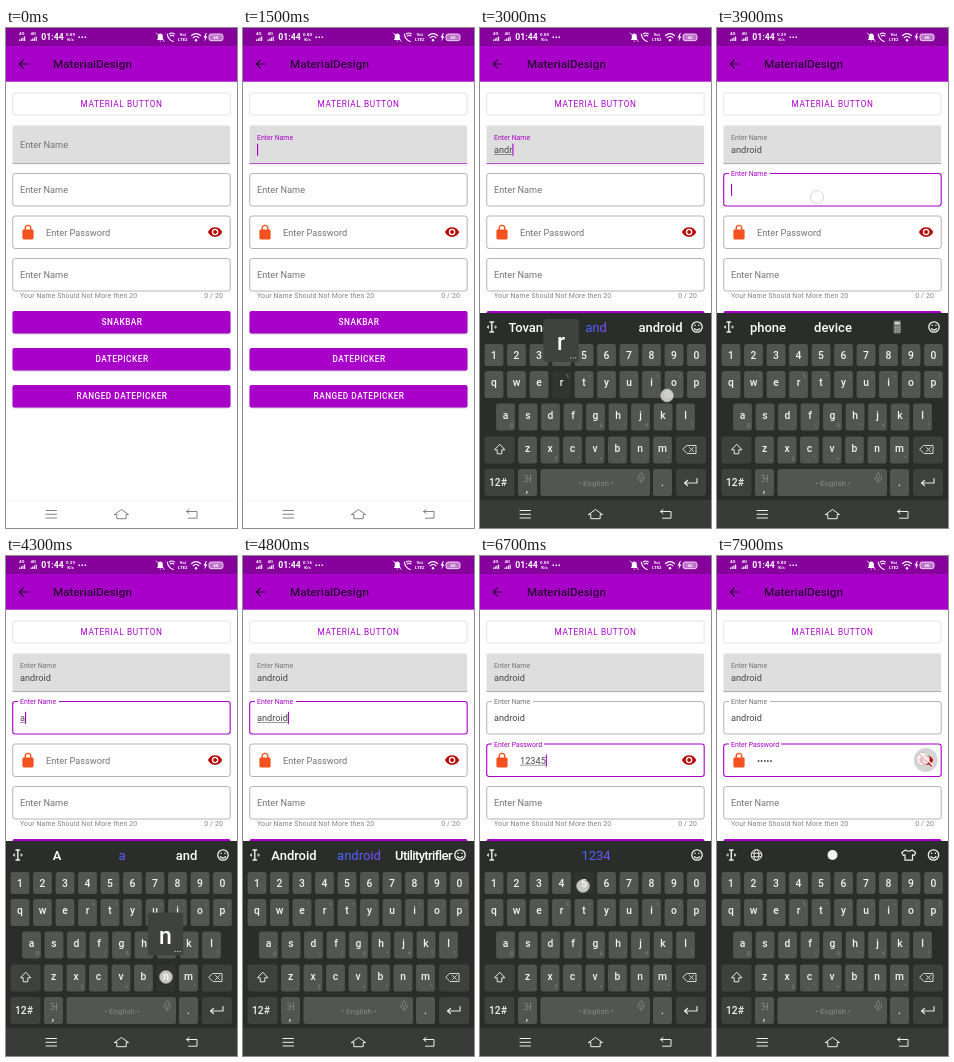
Animation, 231 px wide and 500 px high, one loop 8000 ms. Source, as an HTML page:

```html
<!DOCTYPE html>
<html lang="en">
<head>
<meta charset="utf-8">
<title>Material form</title>
<style>
html, body { margin: 0; width: 100%; height: 100%; overflow: hidden; background: #fff; }
svg { display: block; width: 100vw; height: 100vh; font-family: Roboto, sans-serif; }
text { white-space: pre; }
.mid { text-anchor: middle; }
.btn { font-size: 8.25px; font-weight: 500; letter-spacing: .52px; text-anchor: middle; }
.line { fill: none; stroke-linecap: round; stroke-linejoin: round; }
.help { font-size: 6.9px; fill: #828282; letter-spacing: .16px; }
.key { font-size: 10.3px; font-weight: 500; fill: #f2f2f2; text-anchor: middle; }
.alt { font-size: 4.5px; fill: #868983; text-anchor: middle; }
.sug { font-size: 13px; font-weight: 500; fill: #fff; text-anchor: middle; }
.tiny { font-size: 4.4px; font-weight: 700; }
</style>
</head>
<body>
<svg viewBox="0 0 231 500">
  <defs>
    <linearGradient id="hue">
      <stop offset="0" stop-color="#3f6bff"/><stop offset=".6" stop-color="#5a58ff"/><stop offset="1" stop-color="#7a50f5"/>
    </linearGradient>
    <g id="nav" class="line">
      <path d="M40 482.500h10.500M40 486.300h10.500M40 490h10.500"/>
      <path d="M108.500 486.500l7-5 7 5h-2.300v4.200h-9.400v-4.200z"/>
      <path d="M183 481.500l-2.500 2 2.500 2M180.500 483.500h10.500v6.700h-8.500"/>
    </g>
    <g id="caret" class="line" stroke="#eee">
      <path d="M10 294h3.600M10 304h3.600M11.800 294v10" stroke-width="1.400"/>
      <path d="M8.300 298l-1.300 1 1.300 1zM15.300 298l1.300 1-1.300 1z" stroke-width=".8"/>
    </g>
    <g id="smile" class="line" stroke="#f4f4f4" stroke-width="1.300">
      <circle cx="216.500" cy="299" r="5.200"/><path d="M214 300.800q2.500 2.600 5 0"/>
      <path d="M214.600 297.200v.2M218.400 297.200v.2"/>
    </g>
  </defs>

  <rect width="231" height="500" fill="#fefefe"/>
  <rect width="231" height="53.700" fill="#a800c8"/>
  <rect width="231" height="18" fill="#86009c"/>

  <g fill="#fff">
    <text class="tiny" x="13" y="7.300">4G</text><text class="tiny" x="24.500" y="7.300">4G</text>
    <path id="bars"/>
    <text x="35.300" y="12.300" font-size="8.700" font-weight="700">01:44</text>
    <text id="speed" class="tiny mid" x="64.500" y="8"></text>
    <text class="tiny mid" x="64.500" y="12.600">K/s</text>
    <path d="M72.500 9.300h1.500M75.500 9.300h1.500M78.500 9.300h1.500" stroke="#fff" stroke-width="1.500"/>
    <g transform="translate(-1.200 0)">
      <path d="M152 12h7l-1-1.500V8q0-2.500-2.500-2.500T153 8v2.500zM154.500 12.700h2l-1 1z"/>
      <path class="line" d="M151.500 5l8 8.500" stroke="#fff" stroke-width=".8"/>
      <path class="line" d="M162.500 6q.5 5.500 6 7.500M165.500 8q1.800-1.500 3.500 0M164.500 6q2.500-2 5 0" stroke="#fff" stroke-width="1.100"/>
      <text class="tiny mid" x="178" y="8">Vo)</text><text class="tiny mid" x="178" y="13">LTE2</text>
    </g>
    <path class="line" d="M185.500 7.500q4.500-3.800 9 0M187.200 9.700q2.800-2.400 5.600 0" stroke="#fff" stroke-width="1.200"/>
    <circle cx="190" cy="12.300" r="1.200"/>
    <path d="M200 5l-2.500 4.500h1.700l-.8 4 3-5h-1.800l1.200-3.500z"/>
    <rect x="203" y="6" width="14" height="6.700" rx="2.200" fill-opacity=".45" stroke="#fff" stroke-width=".8"/>
    <text class="tiny mid" x="210" y="11">60</text>
  </g>

  <path class="line" d="M22 36h-8.500M17.500 31.800l-4.200 4.200 4.200 4.200" stroke="#2b0a33" stroke-width="1.200"/>
  <text x="47" y="40" font-size="11.650" font-weight="500" fill="#2b0a33">MaterialDesign</text>

  <rect x="6.700" y="65" width="217.500" height="22" rx="2" fill="#fff" stroke="#dcdcdc" stroke-width=".8"/>
  <text class="btn" x="115.500" y="79" fill="#a800c8" style="font-weight:400;letter-spacing:.6px">MATERIAL BUTTON</text>

  <g id="form"></g>
  <path transform="translate(13.600 196) scale(.7)" fill="#f4511e" fill-rule="evenodd"
    d="M18 8h-1V6a5 5 0 0 0-10 0v2H6a2 2 0 0 0-2 2v10a2 2 0 0 0 2 2h12a2 2 0 0 0 2-2V10a2 2 0 0 0-2-2zM9 8V6a3 3 0 0 1 6 0v2z"/>
  <circle id="ripple" cx="208.800" cy="204" fill="#000"/>
  <path transform="translate(201.300 196.200) scale(.65)" fill="#b80a0a" fill-rule="evenodd"
    d="M12 4.500C7 4.500 2.730 7.610 1 12c1.730 4.390 6 7.500 11 7.500s9.270-3.110 11-7.500c-1.730-4.390-6-7.500-11-7.500zm0 12.500a5 5 0 1 1 0-10 5 5 0 0 1 0 10zm0-8a3 3 0 1 0 0 6 3 3 0 0 0 0-6z"/>
  <g id="slash" class="line">
    <path d="M203.800 197.600l11.500 11.500" stroke="#fff" stroke-width="1.400"/>
    <path d="M202.800 198.400l11.500 11.500" stroke="#b80a0a" stroke-width="1.300"/>
  </g>
  <text class="help" x="14" y="270">Your Name Should Not More then 20</text>
  <text class="help" x="217" y="270" text-anchor="end">0 / 20</text>
  <g id="buttons"></g>
  <path d="M0 472.300h231" stroke="#eee" stroke-width=".6"/>
  <use href="#nav" stroke="#777" stroke-width=".9"/>

  <g id="board">
    <rect y="285" width="231" height="215" fill="#2b2d2a"/>
    <rect y="472" width="231" height="28" fill="#393b38"/>
    <use href="#nav" stroke="#eee" stroke-width="1"/>
    <g id="keys"></g>
    <g class="line" stroke="#e6e6e6">
      <path d="M19.500 416.500l-5 5.300h2.700v4h4.600v-4h2.700z"/>
      <path d="M207 417.500h9v8h-9l-4-4zM209.500 419.500l4 4M213.500 419.500l-4 4" stroke-width=".9"/>
      <path d="M217 450.500v4.500h-12.500M207.500 452.500l-3 2.500 3 2.500" stroke-width="1.200"/>
    </g>
    <text class="key" x="18" y="457.500">12#</text>
    <path class="line" d="M44 447.500q3.500-1.500 3.500 1 0 1.700-2 1.700 2.500 0 2.500 2 0 2.500-3.500 1.200M48 450.500h2.500M50.500 447v7" stroke="#868983" stroke-width=".8"/>
    <text class="key" x="47" y="464">,</text>
    <text class="key" x="182.500" y="457.500">.</text>
    <text class="mid" x="116" y="457.500" font-size="8" fill="#868983">• English •</text>
    <g class="line" stroke="#868983" stroke-width=".8">
      <rect x="159.700" y="445" width="3" height="6" rx="1.500"/><path d="M157.700 449q0 4 3.500 4t3.500-4M161.200 453v2"/>
    </g>
    <g id="tools">
      <use href="#caret" x="2.500"/>
      <g class="line" stroke="#eee" stroke-width="1">
        <circle cx="39.500" cy="299" r="5.300"/><ellipse cx="39.500" cy="299" rx="2.400" ry="5.300"/><path d="M34.500 297.200h10M34.500 300.800h10"/>
        <path d="M188.500 294l-3.700 2.500 1.500 3 1.700-.8v5.500h7.500v-5.500l1.700.8 1.500-3-3.700-2.500q-3.200 2.500-6.500 0z" stroke-width="1.200"/>
      </g>
      <circle cx="115.500" cy="299" r="5" fill="#f4f4f4"/>
      <use href="#smile"/>
    </g>
    <g id="hints">
      <use href="#caret"/><use href="#smile" x=".5"/>
      <text class="sug" x="51" y="303.500"></text>
      <text class="sug" x="116" y="303.500"></text>
      <text class="sug" x="180.500" y="303.500"></text>
      <g id="calc">
        <rect x="176.500" y="292.500" width="7.500" height="13" rx="1" fill="#6d706b"/>
        <rect x="177.700" y="293.800" width="5.100" height="2.700" fill="#c8d2cc"/>
        <path d="M177.700 299h5.100M177.700 301.300h5.100M177.700 303.600h5.100" stroke="#c4c4c4" stroke-dasharray="1.300 .6"/>
      </g>
    </g>
    <g id="popup">
      <rect x="-17.700" width="35.400" height="43" rx="3" fill="#40423e"/>
      <text class="mid" y="31" font-size="23" font-weight="500" fill="#fff"></text>
      <path d="M9 39h1.200M11.500 39h1.200M14 39h1.200" stroke="#ccc"/>
    </g>
  </g>
  <circle id="dot" r="6.500" fill="#fff" fill-opacity=".72" stroke="#aaa" stroke-opacity=".7" stroke-width=".7"/>
</svg>
<script>
const LOOP = 8000, PURPLE = '#a800c8', GREY = '#747474', KEY = '#535650', PRESSED = '#323430';
const $ = id => document.getElementById(id);
const show = (el, on) => el.setAttribute('visibility', on ? 'inherit' : 'hidden');
const set = (el, attrs) => { for (const k in attrs) el.setAttribute(k, attrs[k]); };
const ease = x => { x = Math.min(1, Math.max(0, x)); return 1 - (1 - x) ** 3; };
const mix = (a, b, p) => a + (b - a) * p;
const last = (list, t) => list.filter(e => e[0] <= t).pop();

// Signal bars
$('bars').setAttribute('d', [13, 24.5].map(x =>
  [0, 1, 2, 3].map(i => `M${x + i * 1.7} 13v${-1.4 - i}h1.100v${1.4 + i}z`).join('')).join(''));

$('buttons').innerHTML = [['SNAKBAR', 283], ['DATEPICKER', 320], ['RANGED DATEPICKER', 357]].map(([s, y]) =>
  `<rect x="6.500" y="${y + 1}" width="218" height="22.500" rx="2" opacity=".18"/>
   <rect x="6.500" y="${y}" width="218" height="22.500" rx="2" fill="${PURPLE}"/>
   <text class="btn" x="116" y="${y + 14.3}" fill="#fff">${s}</text>`).join('');

// Form fields
const fields = [
  { hint: 'Enter Name', top: 97.5, h: 38.5, x: 14, rest: 119.8, float: 111.6, base: 124.7, at: 1250, filled: true },
  { hint: 'Enter Name', top: 145.5, h: 32.5, x: 14, rest: 164.8, float: 148.2, base: 164.8, at: 3680 },
  { hint: 'Enter Password', top: 188, h: 32.5, x: 40, rest: 207.5, float: 190.5, base: 207.5, at: 5480 },
  { hint: 'Enter Name', top: 230.5, h: 32.5, x: 14, rest: 249.8, float: 233, base: 250, at: Infinity }
];
for (const f of fields) {
  const g = document.createElementNS('http://www.w3.org/2000/svg', 'g');
  g.innerHTML = (f.filled
    ? `<path d="M6.500 136V99.500q0-2 2-2h213.700q2 0 2 2V136z" fill="#dedede"/><path d="M6.500 135.600h217.700"/>`
    : `<rect/><rect x="6.700" y="${f.top}" width="217.500" height="${f.h}" rx="2.500" fill="none"/>`) +
    `<rect y="${f.top - 2}" height="4" fill="${f.filled ? 'none' : '#fefefe'}"/>
     <text>${f.hint}</text>
     <text x="${f.x}" y="${f.base}" font-size="9.200" fill="#484848"></text>
     <rect x="${f.x}" y="${f.base + 1.3}" height=".6" fill="#555"/>
     <rect y="${f.base - 9}" width="1.100" height="12" fill="${PURPLE}"/>`;
  $('form').append(g);
  [, f.edge, f.notch, f.label, f.text, f.under, f.cursor] = g.children;
}

// Keyboard: characters, small symbols, first centre, top, height, touch offset
const rows = [
  ['1234567890', '', 14, 316, 22, -1, 3],
  ['qwertyuiop', '-~`%=|<>{}', 14, 343, 27, -7, 11],
  ['asdfghjkl', '@;:(&*#!?', 25.5, 375.5, 27, 0, 0],
  ['zxcvbnm', '_$"+/\'^', 47.5, 408.5, 27, 0, -1]
];
const keys = {};
const cap = (x, y, w, h, fill = KEY) =>
  `<rect x="${x}" y="${y}" width="${w}" height="${h}" rx="2.500" fill="${fill}"/>`;
const esc = c => c === '<' ? '&lt;' : c === '&' ? '&amp;' : c;
let caps = '';
rows.forEach(([chars, alts, x0, y, h, dx, dy], row) => [...chars].forEach((c, i) => {
  const x = x0 + i * 22.5;
  keys[c] = { x, y, row, tx: x + dx, ty: y + h / 2 + dy };
  caps += `<g id="key-${c}">${cap(x - 9.4, y, 18.8, h)}<text class="key" x="${x}" y="${y + (row ? 15.2 : 14.8)}">${c}</text>` +
    (alts ? `<text class="alt" x="${x + 6}" y="${y + (row > 1 ? 23 : 7)}">${esc(alts[i])}</text>` : '') + '</g>';
}));
for (const y of [408.5, 441]) for (const x of [4.5, 196]) caps += cap(x, y, 30, 27, '#3e413c');
caps += cap(38, 441, 19, 27) + cap(60.5, 441, 109.5, 27) + cap(173, 441, 19, 27);
$('keys').innerHTML = caps;
for (const c in keys) keys[c].cap = $('key-' + c).firstChild;

const strokes = [
  ['android', [2550, 2700, 2830, 2950, 3070, 3210, 3400]],
  ['android', [4220, 4340, 4420, 4500, 4570, 4640, 4720]],
  ['12345', [6300, 6400, 6500, 6580, 6670]]
];
const presses = strokes.flatMap(([word, times]) => times.map((t, i) => [t, word[i]]));
const touches = [
  [1150, 1300, 100, 118], [3640, 3950, 100, 169], [5430, 5600, 110, 205],
  [7200, 7340, 207, 204], [7790, LOOP, 206, 203],
  ...presses.map(([t, c]) => [t - 90, t + 40, keys[c].tx, keys[c].ty])
];
const HIDE = 7330;

// Suggestions trail each key press by 60 ms
const word = [['A', 'a', 'and'], ['An', 'an', 'and'], ['Tovanel', 'and', 'android'], ['Android', 'andr', 'android'],
  ['Android', 'andro', 'android'], ['Android', 'androi', 'android'], ['Android', 'android', 'Utilitytrifler']];
const hints = [
  [0], ...strokes[0][1].map((t, i) => [t + 60, ...word[i]]),
  [3680, 'phone', 'device', ''], ...strokes[1][1].map((t, i) => [t + 60, ...word[i]]),
  [5500], ...strokes[2][1].map((t, i) => [t + 60, '', '12345'.slice(0, i + 1), '']), [HIDE]
];
const speeds = [[0, '0.09'], [800, '0.00'], [3450, '0.39'], [4350, '0.16'], [5500, '0.00']];

function drawField(f, i, t) {
  const focused = t >= f.at && !(fields[i + 1].at <= t);
  const p = ease((t - f.at) / 167);
  const size = mix(9.2, 6.9, p);
  set(f.label, { x: mix(f.x, 14, p), y: mix(f.rest, f.float, p), 'font-size': size, fill: focused ? PURPLE : GREY });
  set(f.edge, { stroke: focused ? PURPLE : '#969696', 'stroke-width': focused && !f.filled ? 1.1 : .7 });
  const gap = (f.hint.length > 10 ? 52 : 41) * p;
  set(f.notch, { x: 12 + (1 - p) * 20, width: gap });

  const [full, times] = strokes[i];
  const typed = times.filter(k => k <= t);
  const masked = i === 2 && t >= HIDE;
  const value = masked ? '•'.repeat(typed.length) : full.slice(0, typed.length);
  if (f.text.textContent !== value) f.text.textContent = value;
  const width = value ? f.text.getComputedTextLength() : 0;
  set(f.under, { width: focused && !masked ? width : 0 });
  const edit = Math.max(f.at, masked ? HIDE : 0, ...typed);
  f.cursor.setAttribute('x', f.x + width);
  show(f.cursor, focused && (t - edit) % 1000 < 500);
}

function drawIdle(f) {
  set(f.label, { x: f.x, y: f.rest, 'font-size': 9.2, fill: GREY });
  set(f.edge, { stroke: '#969696', 'stroke-width': .7 });
  show(f.cursor, false);
}

function render(t) {
  $('speed').textContent = last(speeds, t)[1];
  fields.forEach((f, i) => i < 3 ? drawField(f, i, t) : drawIdle(f));

  const open = ease((t - 1560) / 240);
  show($('board'), open > 0);
  set($('board'), { transform: `translate(0 ${215 * (1 - open)})` });

  const [, ...words] = last(hints, t);
  const predicted = words[1] === 'device';
  show($('tools'), !words.length);
  show($('hints'), words.length > 0);
  [...$('hints').querySelectorAll('text')].forEach((el, i) => {
    el.textContent = words[i] || '';
    el.style.letterSpacing = el.textContent.length > 10 ? '-.6px' : '0';
    if (i !== 1) return;
    el.style.fill = predicted ? '#fff' : 'url(#hue)';
    el.style.fontWeight = predicted ? 500 : 400;
  });
  show($('calc'), predicted);

  const press = presses.filter(([k]) => t >= k - 40 && t < k + 60).pop();
  for (const c in keys) keys[c].cap.setAttribute('fill', press && press[1] === c ? PRESSED : KEY);
  const k = press && keys[press[1]];
  show($('popup'), k && k.row > 0);
  if (k) {
    set($('popup'), { transform: `translate(${k.x - .5} ${k.y - 52})` });
    $('popup').querySelector('text').textContent = press[1];
  }

  const touch = touches.filter(e => t >= e[0] && t < e[1]).sort((a, b) => a[0] - b[0]).pop();
  show($('dot'), touch);
  if (touch) set($('dot'), { cx: touch[2], cy: touch[3] });

  show($('slash'), t >= HIDE);
  const [from, to] = t < 7790 ? [7200, 7340] : [7790, LOOP];
  set($('ripple'), { r: 12 * ease((t - from) / 130), opacity: .16 * (1 - ease((t - to) / 250)) });
}

function tick(now) {
  render(now % LOOP);
  requestAnimationFrame(tick);
}
render(0);
requestAnimationFrame(tick);
</script>
</body>
</html>
```
